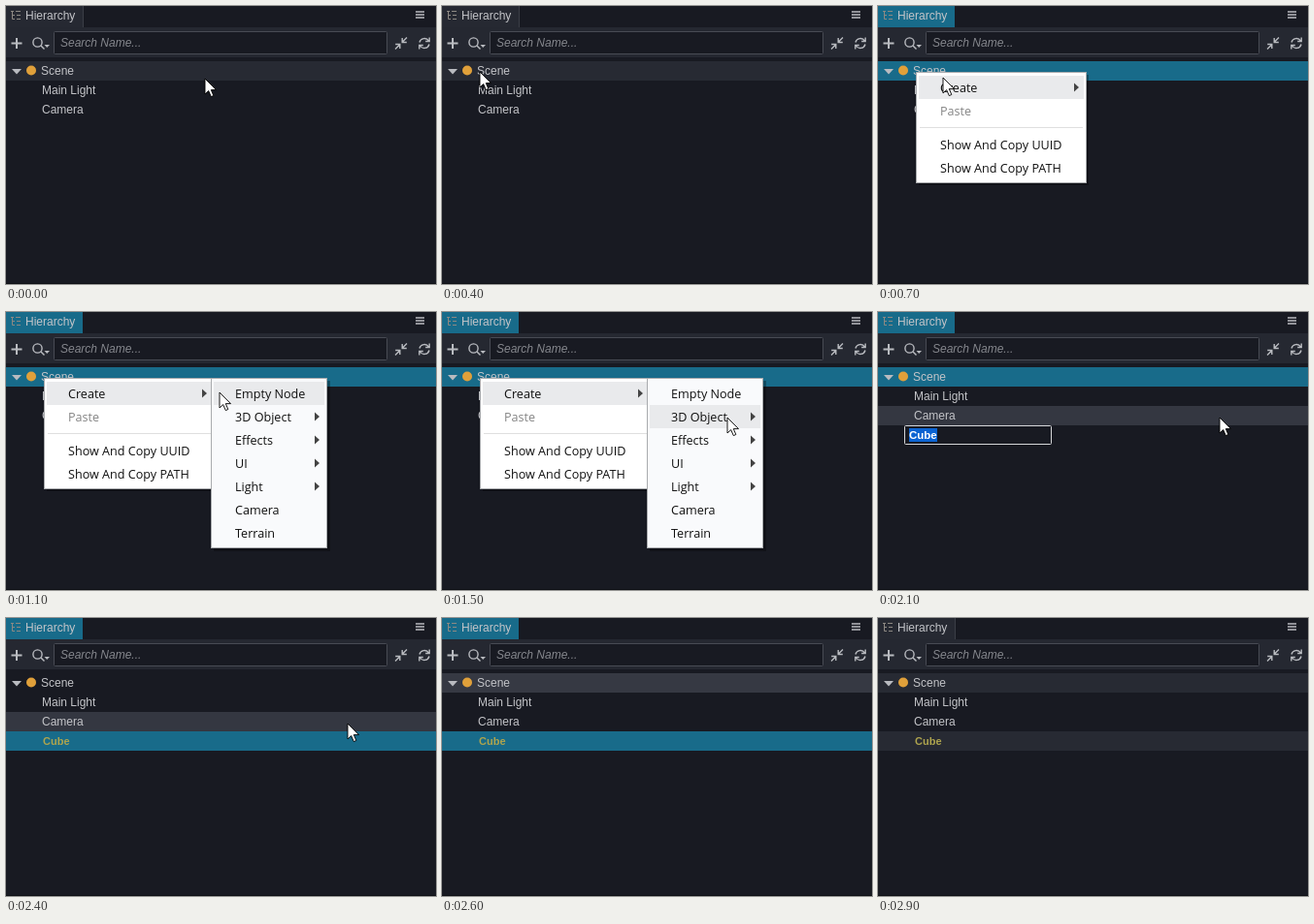
Recreate the animation shown at these times as an HTML page. Size 443 by 287 pixels, loop 3000 ms.

```html
<!DOCTYPE html>
<html lang="en">
<head>
<meta charset="utf-8">
<title>Hierarchy panel</title>
<style>
html, body { margin: 0; width: 100%; height: 100%; overflow: hidden; background: #181a22; }
svg { display: block; width: 443px; height: 287px; }
text { font: 12px "Liberation Sans", Arial, sans-serif; fill: #c3c4c8; }
.bold { font-size: 11px; font-weight: bold; }
.hint { font-style: italic; fill: #85878d; }
.menu text { font: 12.6px "Open Sans", "Noto Sans", sans-serif; fill: #111; }
.menu .off { fill: #858585; }
.shade { fill: #000; opacity: .3; }
.face { fill: #f9fafc; stroke: #a9abae; }
.hl { fill: #e9eaec; }
.arrow { fill: #444; }
.line { fill: none; stroke: #b9bbc0; stroke-width: 1.4; }

/* 100 ms = 3.333 %; changes snap to that clock */
.anim { animation: 3s step-end infinite; }
#tab { animation-name: tab; }
#edge { animation-name: edge; }
#sceneRow { animation-name: scene-row; }
#cameraRow { animation-name: camera-row; }
#cubeRow { animation-name: cube-row; }
#cubeFill { animation-name: cube-fill; }
#edit { animation-name: edit; }
#main { animation-name: main; }
#sub { animation-name: sub; }
#shapes { animation-name: shapes; }
#hlCreate { animation-name: hl-create; }
#hlEmpty { animation-name: hl-empty; }
#hl3d { animation-name: hl-3d; }
#hlCube { animation-name: hl-cube; }
#cursor { animation-name: cursor; }

@keyframes tab { 0%, 93.32% { fill: #262932; } 16.66% { fill: #186b8a; } 100% { fill: #262932; } }
@keyframes edge { 0%, 93.32% { visibility: visible; } 16.66% { visibility: hidden; } 100% { visibility: visible; } }
@keyframes scene-row {
  0% { fill: #272a33; } 16.66% { fill: #186b8a; } 79.99% { fill: #181a22; }
  83.32% { fill: #363943; } 93.32%, 100% { fill: #272a33; }
}
@keyframes camera-row { 0%, 83.32%, 100% { visibility: hidden; } 69.99% { visibility: visible; } }
@keyframes cube-row { 0%, 100% { visibility: hidden; } 79.99% { visibility: visible; } }
@keyframes cube-fill { 0% { fill: #186b8a; } 93.32%, 100% { fill: #272a33; } }
@keyframes edit { 0%, 79.99%, 100% { visibility: hidden; } 69.99% { visibility: visible; } }
@keyframes main { 0%, 69.99%, 100% { visibility: hidden; } 19.99% { visibility: visible; } }
@keyframes sub { 0%, 69.99%, 100% { visibility: hidden; } 33.32% { visibility: visible; } }
@keyframes shapes { 0%, 69.99%, 100% { visibility: hidden; } 53.32% { visibility: visible; } }
@keyframes hl-create { 0%, 69.99%, 100% { visibility: hidden; } 23.32% { visibility: visible; } }
@keyframes hl-empty { 0%, 43.32%, 100% { visibility: hidden; } 36.66% { visibility: visible; } }
@keyframes hl-3d { 0%, 69.99%, 100% { visibility: hidden; } 43.32% { visibility: visible; } }
@keyframes hl-cube { 0%, 69.99%, 100% { visibility: hidden; } 56.66% { visibility: visible; } }
@keyframes cursor {
  0% { transform: translate(205px, 75px); }
  3.33% { transform: translate(168px, 73px); }
  6.66% { transform: translate(118px, 71px); }
  9.99% { transform: translate(72px, 69px); }
  13.33% { transform: translate(39px, 68px); }
  23.32% { transform: translate(67px, 74px); }
  26.66% { transform: translate(105px, 81px); }
  29.99% { transform: translate(148px, 84px); }
  33.32% { transform: translate(190px, 84px); }
  36.66% { transform: translate(220px, 83px); }
  39.99% { transform: translate(244px, 90px); }
  43.32% { transform: translate(262px, 102px); }
  46.66% { transform: translate(277px, 108px); }
  49.99% { transform: translate(294px, 109px); }
  53.32% { transform: translate(314px, 109px); }
  56.66% { transform: translate(336px, 109px); }
  59.99% { transform: translate(352px, 109px); }
  83.32% { transform: translate(368px, 62px); }
  86.66%, 100% { transform: translate(500px, -40px); }
}
</style>
</head>
<body>
<svg viewBox="0 0 443 287">
  <defs>
    <path id="tip" d="M0 -4.5L5 0L0 4.5Z"/>
  </defs>

  <!-- title bar -->
  <rect width="443" height="287" fill="#181a22"/>
  <rect y="22" width="443" height="31" fill="#252831"/>
  <rect id="tab" class="anim" width="79" height="22"/>
  <rect id="edge" class="anim" x="79" width="1" height="22" fill="#3b3e47"/>
  <path d="M5 5.5H8M6.5 5.5V13.5M6.5 9.5H9M6.5 13.5H9M10 5.5H15M11 9.5H15M11 13.5H15" fill="none" stroke="#8d8983"/>
  <text x="20" y="14">Hierarchy</text>
  <path class="line" d="M422 6H431M422 9H431M422 12H431"/>

  <!-- toolbar -->
  <path d="M5.5 38.5H16.5M11 33V44" stroke="#b9bbc0" stroke-width="2"/>
  <circle class="line" cx="32.5" cy="37.5" r="4.6"/>
  <path class="line" d="M36 41L39.5 44.5"/>
  <path d="M39.5 40H45L42.2 43Z" fill="#b9bbc0"/>
  <rect x="49.5" y="26.5" width="343" height="23" rx="1" fill="#181a22" stroke="#484b54"/>
  <text class="hint" x="56" y="42">Search Name...</text>
  <path class="line" d="M413 32.5L408.5 37M408.2 33V37.5H412.8M401 44.5L405.5 40M401.2 39.5H405.8V44"/>
  <path class="line" d="M426 37.5A5.2 5.2 0 0 1 435.5 36M436.2 32.5V36.5H432.2M436 39.5A5.2 5.2 0 0 1 426.5 41M425.8 44.5V40.5H429.8"/>

  <!-- tree -->
  <rect id="sceneRow" class="anim" y="57" width="443" height="20"/>
  <rect id="cameraRow" class="anim" y="97" width="443" height="20" fill="#343741"/>
  <path d="M6 65H16L11 70.5Z" fill="#b9bbc0"/>
  <circle cx="26" cy="66.5" r="5" fill="#e0a03a"/>
  <text x="36" y="71">Scene</text>
  <text x="37" y="91">Main Light</text>
  <text x="37" y="111">Camera</text>
  <g id="cubeRow" class="anim">
    <rect id="cubeFill" class="anim" y="117" width="443" height="20"/>
    <text class="bold" x="38" y="131" style="fill:#aea44e">Cube</text>
  </g>
  <g id="edit" class="anim">
    <rect x="27.5" y="117.5" width="151" height="19" rx="1" fill="#181a22" stroke="#d5d6d9"/>
    <rect x="32" y="120" width="29" height="14" fill="#0b63d2"/>
    <text class="bold" x="32" y="131" style="font-size:11.5px;fill:#fff">Cube</text>
  </g>
  <rect y="286" width="443" height="1" fill="#0f1116"/>

  <!-- context menus -->
  <g id="main" class="menu anim">
    <rect class="shade" x="42" y="71" width="175" height="114"/>
    <rect class="face" x="39.5" y="68.5" width="175" height="114" style="fill:#fff"/>
    <rect id="hlCreate" class="hl anim" x="42" y="72" width="170" height="24"/>
    <path d="M43 125.5H211" stroke="#dfdfdf"/>
    <use href="#tip" class="arrow" x="202" y="84"/>
    <text x="64" y="89">Create</text>
    <text x="64" y="113" class="off">Paste</text>
    <text x="64" y="148">Show And Copy UUID</text>
    <text x="64" y="172">Show And Copy PATH</text>
  </g>
  <g id="sub" class="menu anim">
    <rect class="shade" x="214" y="71" width="120" height="176"/>
    <rect class="face" x="211.5" y="68.5" width="119" height="175"/>
    <rect id="hlEmpty" class="hl anim" x="214" y="72" width="114" height="24"/>
    <rect id="hl3d" class="hl anim" x="214" y="96" width="114" height="24"/>
    <g class="arrow">
      <use href="#tip" x="318" y="108"/>
      <use href="#tip" x="318" y="132"/>
      <use href="#tip" x="318" y="156"/>
      <use href="#tip" x="318" y="180"/>
    </g>
    <text y="89"><tspan x="236">Empty Node</tspan><tspan x="236" dy="24">3D Object</tspan><tspan x="236" dy="24">Effects</tspan><tspan x="236" dy="24">UI</tspan><tspan x="236" dy="24">Light</tspan><tspan x="236" dy="24">Camera</tspan><tspan x="236" dy="24">Terrain</tspan></text>
  </g>
  <g id="shapes" class="menu anim">
    <rect class="face" x="327.5" y="92.5" width="95" height="210"/>
    <rect id="hlCube" class="hl anim" x="330" y="96" width="90" height="24"/>
    <text y="113"><tspan x="352">Cube</tspan><tspan x="352" dy="24">Cylinder</tspan><tspan x="352" dy="24">Sphere</tspan><tspan x="352" dy="24">Capsule</tspan><tspan x="352" dy="24">Cone</tspan><tspan x="352" dy="24">Torus</tspan><tspan x="352" dy="24">Plane</tspan><tspan x="352" dy="24">Quad</tspan></text>
  </g>

  <path id="cursor" class="anim" d="M0 0V16L3.7 12.6L6.3 18.6L8.8 17.5L6.3 11.6H11.5Z" fill="#fff" stroke="#000" stroke-width=".9"/>
</svg>
</body>
</html>
```
